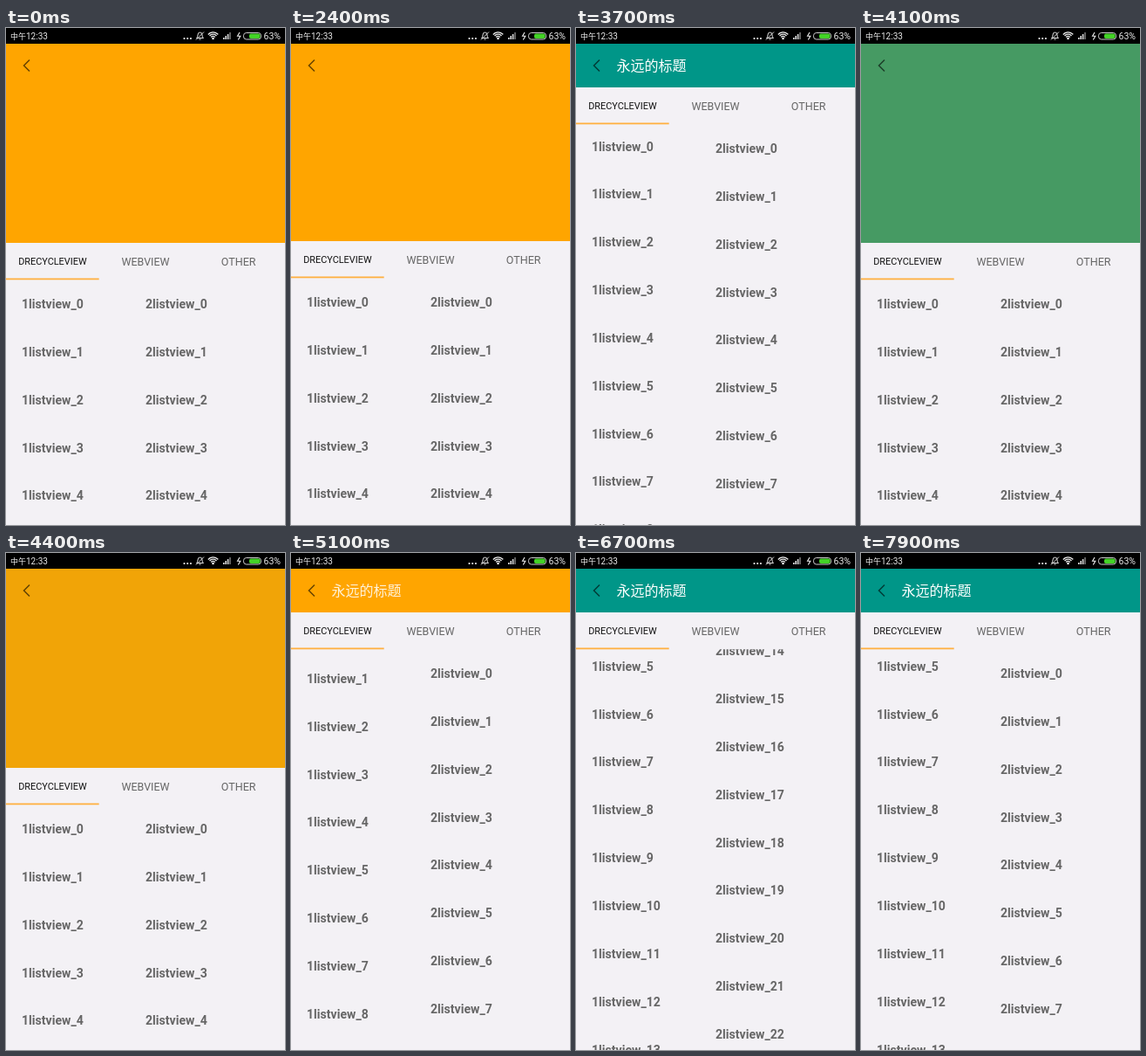
These frames come from a looping animation (320x569 px, 8 s). An HTML page with a canvas:

```html
<!DOCTYPE html>
<html lang="zh-CN">
<head>
<meta charset="utf-8">
<title>Collapsing header</title>
<style>
html, body { margin: 0; width: 100%; height: 100%; overflow: hidden; background: #f3f1f5; }
canvas { display: block; width: 100vw; height: 100vh; }
</style>
</head>
<body>
<canvas></canvas>
<script>
const W = 320, H = 569, LOOP = 8000, STEP = 100;
const EXPANDED = 245.6, COLLAPSE = 178, TABS = 42.7, ROW = 54.85, ROWS = 30;
const LATIN = 'Roboto, sans-serif';
const CJK = '"Noto Sans CJK SC", "Noto Sans CJK", sans-serif';
const ORANGE = [255, 165, 0], TEAL = [0, 150, 136];

const canvas = document.querySelector('canvas');
const ctx = canvas.getContext('2d');

const linear = p => p;
const smooth = p => (1 - Math.cos(Math.PI * p)) / 2;
const easeOut = p => 1 - (1 - p) ** 2;
const easeIn = p => p ** 1.5;

// Each key is [time, value, easing into this key].
const pull = [[2300, 0], [2400, 2], [2600, 28], [3100, 174], [3200, 180.5],
  [3700, 180.5], [4050, 0, smooth], [4800, 0], [4900, 20], [5100, 227], [5800, 460.5, easeOut]];
const tint = [[3080, 0], [3680, 1, smooth], [3890, 1], [4490, 0, smooth], [5090, 0], [5690, 1, smooth]];
const titleAlpha = [[2900, 0], [3200, 0.9], [3300, 1], [3800, 1], [4000, 0],
  [4900, 0], [5100, 0.85], [5300, 1]];
const rightScroll = [[6185, 0], [7400, 1188, easeOut], [7500, 1188], [7900, 0, easeIn]];

function valueAt(keys, t) {
  const next = keys.findIndex(key => key[0] > t);
  if (next === 0) return keys[0][1];
  if (next < 0) return keys[keys.length - 1][1];
  const [t0, v0] = keys[next - 1];
  const [t1, v1, ease = linear] = keys[next];
  return v0 + (v1 - v0) * ease((t - t0) / (t1 - t0));
}

function text(str, x, y, font, color, align = 'left') {
  ctx.font = font;
  ctx.fillStyle = color;
  ctx.textAlign = align;
  ctx.fillText(str, x, y);
}

function rect(x, y, w, h, color) {
  ctx.fillStyle = color;
  ctx.fillRect(x, y, w, h);
}

function line(points, color, width) {
  ctx.beginPath();
  points.forEach(([x, y]) => ctx.lineTo(x, y));
  ctx.strokeStyle = color;
  ctx.lineWidth = width;
  ctx.stroke();
}

function dot(x, y, r, color) {
  ctx.beginPath();
  ctx.arc(x, y, r, 0, Math.PI * 2);
  ctx.fillStyle = color;
  ctx.fill();
}

function pill(x, y, w, h, r) {
  ctx.beginPath();
  ctx.roundRect(x, y, w, h, r);
}

function drawBell() {
  ctx.beginPath();
  ctx.moveTo(218.5, 11.5);
  ctx.quadraticCurveTo(220, 10.5, 220, 8);
  ctx.quadraticCurveTo(220, 5, 222.5, 5);
  ctx.quadraticCurveTo(225, 5, 225, 8);
  ctx.quadraticCurveTo(225, 10.5, 226.5, 11.5);
  ctx.closePath();
  ctx.strokeStyle = '#ddd';
  ctx.lineWidth = 1;
  ctx.stroke();
  line([[221.5, 13], [223.5, 13]], '#ddd', 1);
  line([[227, 4.5], [218, 13.5]], '#ddd', 1);
}

function drawWifi() {
  ctx.strokeStyle = '#eee';
  ctx.lineWidth = 1.3;
  for (const r of [3, 5.3, 7.6]) {
    ctx.beginPath();
    ctx.arc(237.5, 12.5, r, -Math.PI * 0.77, -Math.PI * 0.23);
    ctx.stroke();
  }
  dot(237.5, 12, 1.3, '#eee');
}

function drawBattery() {
  pill(272.5, 5.5, 20, 7.5, 3.2);
  ctx.strokeStyle = '#ccc';
  ctx.lineWidth = 1;
  ctx.stroke();
  pill(279, 6.5, 12.5, 5.5, 1.8);
  ctx.fillStyle = '#43d226';
  ctx.fill();
}

function drawStatusBar() {
  rect(0, 0, W, 18, '#000');
  text('中午', 5, 12.8, `9px ${CJK}`, '#e8e8e8');
  text('12:33', 23, 13, `10px ${LATIN}`, '#e8e8e8');
  for (let i = 0; i < 3; i++) dot(204.5 + i * 3.7, 12, 1.1, '#eee');
  drawBell();
  drawWifi();
  for (let i = 0; i < 4; i++) {
    const h = 2 + i * 2;
    rect(249 + i * 2.4, 13 - h, 1.6, h, i < 3 ? '#ddd' : '#777');
  }
  line([[268, 5], [265.5, 9.2], [268.8, 9.2], [266.3, 13.5]], '#eee', 1.1);
  drawBattery();
  text('63%', 315, 13, `10.5px ${LATIN}`, '#e8e8e8', 'right');
}

function drawHeader(bottom, t) {
  const mix = valueAt(tint, t);
  const rgb = ORANGE.map((c, i) => Math.round(c + (TEAL[i] - c) * mix));
  rect(0, 0, W, Math.ceil(bottom), `rgb(${rgb})`);
  line([[27, 36.5], [20.5, 43], [27, 49.5]], 'rgba(0,0,0,.6)', 1.5);
  ctx.globalAlpha = valueAt(titleAlpha, t);
  text('永远的标题', 46.5, 49, `16px ${CJK}`, '#fff');
  ctx.globalAlpha = 1;
}

function drawTabs(top) {
  text('DRECYCLEVIEW', W / 6, top + 25.4, `10.9px ${LATIN}`, '#111', 'center');
  text('WEBVIEW', W / 2, top + 25.9, `12.4px ${LATIN}`, '#666', 'center');
  text('OTHER', W * 5 / 6, top + 25.9, `12.5px ${LATIN}`, '#666', 'center');
  rect(0, top + TABS - 1.8, W / 3, 1.8, '#ffb040');
}

function drawList(prefix, x, top, scroll) {
  for (let i = 0; i < ROWS; i++) {
    const y = top + 75.4 + i * ROW - scroll;
    if (y > top && y < H + 20) {
      text(`${prefix}listview_${i}`, x, y, `bold 14.1px ${LATIN}`, '#666');
    }
  }
}

function draw(t) {
  const pulled = valueAt(pull, t);
  const top = EXPANDED - Math.min(pulled, COLLAPSE);
  rect(0, 0, W, H, '#f3f1f5');
  ctx.save();
  ctx.beginPath();
  ctx.rect(0, top + TABS, W, H);
  ctx.clip();
  drawList(1, 18, top, Math.max(0, pulled - COLLAPSE));
  drawList(2, 160, top, valueAt(rightScroll, t));
  ctx.restore();
  drawHeader(top, t);
  drawTabs(top);
  drawStatusBar();
}

function resize() {
  const ratio = window.devicePixelRatio || 1;
  canvas.width = Math.round(innerWidth * ratio);
  canvas.height = Math.round(innerHeight * ratio);
}

const start = performance.now();
function frame() {
  const t = (performance.now() - start) % LOOP;
  ctx.setTransform(canvas.width / W, 0, 0, canvas.height / H, 0, 0);
  draw(Math.floor(t / STEP) * STEP);
  requestAnimationFrame(frame);
}

addEventListener('resize', resize);
resize();
frame();
</script>
</body>
</html>
```
